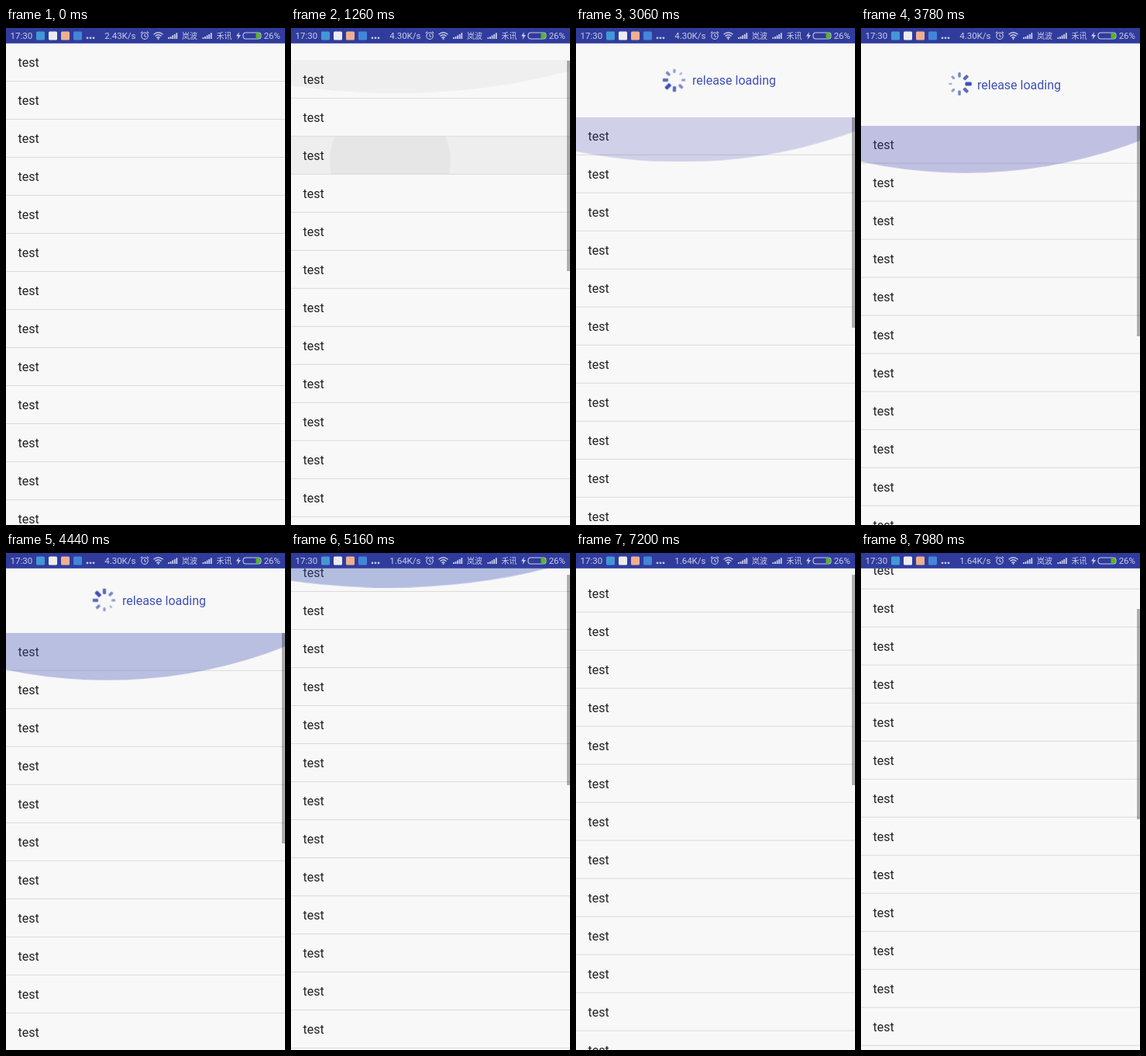
These frames come from a looping animation (360 by 640 pixels, 8000 ms). An HTML page:

```html
<!DOCTYPE html>
<html lang="en">
<head>
<meta charset="utf-8">
<title>Pull to refresh</title>
<style>
@property --pull { syntax: "<number>"; inherits: true; initial-value: 0; }

html, body { margin: 0; width: 100%; height: 100%; overflow: hidden; background: #f8f8f8; }
.stage {
  position: relative; width: 360px; height: 640px; overflow: hidden;
  background: #f8f8f8; font: 16px Roboto, sans-serif; color: #212121;
  animation: pull 8s linear infinite;
}
.stage * { box-sizing: border-box; }

/* Status bar */
.status {
  position: absolute; left: 0; top: 0; width: 360px; height: 20px;
  background: linear-gradient(#303c9c 19.2px, #303c9c80 20px);
}
.status svg { position: absolute; left: 0; top: 0; }
.status span {
  position: absolute; top: 0; line-height: 20px; font-size: 11.5px;
  color: #c9cce8; white-space: nowrap;
}
.status .carrier { font: 10px/20px "Noto Sans CJK SC", "Noto Sans CJK", sans-serif; }
.speed { right: 192.5px; opacity: 0; animation: 8s step-end infinite; }
.speed:nth-of-type(2) { animation-name: speed-a; }
.speed:nth-of-type(3) { animation-name: speed-b; }
.speed:nth-of-type(4) { animation-name: speed-c; }
@keyframes speed-a { 0% { opacity: 1 } 8.25%, 100% { opacity: 0 } }
@keyframes speed-b { 0% { opacity: 0 } 8.25% { opacity: 1 } 58.5%, 100% { opacity: 0 } }
@keyframes speed-c { 0% { opacity: 0 } 58.5%, 100% { opacity: 1 } }

/* Pulled header and list */
.view { position: absolute; left: 0; top: 20px; width: 360px; height: 620px; overflow: hidden; }
.header {
  position: absolute; left: 0; top: 0; width: 360px;
  height: max(0px, calc(var(--pull) * 1px)); overflow: hidden;
  color: #3f51b5;
}
.header > * { opacity: clamp(0, calc((var(--pull) - 32) / 22), 1); }
.header p { position: absolute; left: 150px; top: 50%; margin: -9px 0 0; line-height: 20px; white-space: nowrap; }
.spinner { position: absolute; left: 111px; top: calc(50% - 16.5px); width: 32px; height: 32px; }
.spinner g { animation: spin 8s infinite; }
.list { position: absolute; left: 0; top: 0; width: 360px; transform: translateY(calc(var(--pull) * 1px)); }
.row {
  position: relative; height: 49px; padding-left: 15.5px; line-height: 50px;
  border-bottom: 1px solid #dadada; overflow: hidden;
}
.row b { position: relative; font-weight: 400; }
.press { position: absolute; inset: 0; background: rgba(0, 0, 0, .038); animation: press 8s linear infinite; }
.press::after {
  content: ""; position: absolute; left: 50px; top: -47px; width: 156px; height: 156px;
  border-radius: 50%; background: rgba(0, 0, 0, .035); animation: ripple 8s linear infinite;
}
.glow {
  position: absolute; left: 0; top: 0; width: 360px; height: 72px; overflow: hidden;
  transform-origin: top; animation: glow 8s linear infinite;
}
.glow i {
  position: absolute; left: -405px; bottom: 0; width: 1080px; height: 1080px;
  border-radius: 50%; animation: tint 8s linear infinite, drift 8s linear infinite;
}
.thumb {
  position: absolute; right: 0; width: 4px; height: 271px; background: rgba(0, 0, 0, .3);
  top: calc(max(0, var(--pull)) * 1px + max(0, 0 - var(--pull)) * .436px);
  animation: thumb 8s linear infinite;
}

@keyframes pull {
  0%, 11.25% { --pull: 0 }
  15.75% { --pull: 21.7 }
  22% { --pull: 56 }
  30% { --pull: 84.8 }
  47.25% { --pull: 105.6 }
  54% { --pull: 100 }
  64.5% { --pull: -19 }
  67% { --pull: -16 }
  75% { --pull: 80 }
  79.5% { --pull: 93.7 }
  85% { --pull: 92 }
  97% { --pull: -110 }
  99.75%, 100% { --pull: -120.3 }
}
@keyframes spin {
  0% { transform: rotate(0deg); animation-timing-function: steps(35) }
  62.5% { transform: rotate(1575deg); animation-timing-function: step-end }
  62.51% { transform: rotate(45deg); animation-timing-function: steps(21) }
  100% { transform: rotate(990deg) }
}
@keyframes glow {
  0%, 11.25% { transform: scaleY(0) }
  15.75% { transform: scaleY(.59) }
  30% { transform: scaleY(.76) }
  47.25%, 56% { transform: scaleY(.847) }
  64.5% { transform: scaleY(.605) }
  79.5% { transform: scaleY(.11) }
  81%, 100% { transform: scaleY(0) }
}
@keyframes drift {
  0%, 47.25% { transform: none }
  64.5%, 100% { transform: translateX(-10px) }
}
@keyframes tint {
  0%, 11.25% { background: rgba(0, 0, 0, 0) }
  15.75% { background: rgba(0, 0, 0, .036) }
  30% { background: rgba(63, 55, 172, .13) }
  47.25% { background: rgba(63, 66, 175, .3) }
  64.5% { background: rgba(58, 85, 181, .355) }
  79.5% { background: rgba(63, 66, 175, .08) }
  81%, 100% { background: rgba(63, 66, 175, 0) }
}
@keyframes press {
  0%, 11.25% { opacity: 0 }
  12.5%, 16% { opacity: 1 }
  19.5%, 100% { opacity: 0 }
}
@keyframes ripple {
  0%, 11.25% { transform: scale(0) }
  15.75% { transform: scale(1) }
  19.5%, 100% { transform: scale(1.8) }
}
@keyframes thumb {
  0%, 11.25% { opacity: 0 }
  12%, 69% { opacity: 1 }
  73%, 86% { opacity: 0 }
  87%, 100% { opacity: 1 }
}
</style>
</head>
<body>
<div class="stage">
  <div class="view">
    <div class="header">
      <svg class="spinner" viewBox="-16 -16 32 32"><g id="spokes"></g></svg>
      <p>release loading</p>
    </div>
    <div class="list" id="list"><div class="glow"><i></i></div></div>
    <div class="thumb"></div>
  </div>
  <div class="status">
    <svg width="360" height="20" fill="#c9cce8">
      <rect x="39" y="4.5" width="11" height="11" rx="1.5" fill="#4198d5"/>
      <rect x="55" y="4.5" width="11" height="11" rx="1.5" fill="#ececf0"/>
      <rect x="71" y="4.5" width="11" height="11" rx="1.5" fill="#efb08f"/>
      <rect x="87" y="4.5" width="11" height="11" rx="1.5" fill="#4386d8"/>
      <circle cx="105" cy="12.8" r="1.4"/><circle cx="109" cy="12.8" r="1.4"/><circle cx="113" cy="12.8" r="1.4"/>
      <g fill="none" stroke="#c9cce8" stroke-width="1.1">
        <circle cx="179" cy="10.2" r="4.2"/>
        <path d="M179 7.8v2.6l1.8 1M173.8 6.6l2.4-2M184.2 6.6l-2.4-2"/>
        <path d="M190.5 8.2q6-5 12 0M192.5 10.5q4-3.4 8 0M194.5 12.6q2-1.6 4 0" stroke-width="1.4"/>
        <rect x="306" y="6" width="23" height="8" rx="3.5"/>
      </g>
      <circle cx="196.5" cy="14" r="1"/>
      <path id="bars" d="M209 12h1.8v2h-1.8zM211.6 11h1.8v3h-1.8zM214.2 9.5h1.8v4.5h-1.8zM216.8 8h1.8v6h-1.8zM219.4 6.2h1.8v7.8h-1.8z"/>
      <use href="#bars" x="44.5"/>
      <path d="M301 5l-4 5.6h2.6l-1 4.4 4.4-6h-2.8z"/>
      <path d="M322.5 6.5h3a3 3.5 0 0 1 0 7h-3z" fill="#55b81f"/>
    </svg>
    <span style="left:5.5px">17:30</span>
    <span class="speed">2.43K/s</span>
    <span class="speed">4.30K/s</span>
    <span class="speed">1.64K/s</span>
    <span class="carrier" style="left:227px">岚波</span>
    <span class="carrier" style="left:271.5px">禾讯</span>
    <span style="right:6px">26%</span>
  </div>
</div>
<script>
const ROWS = 29, PRESSED_ROW = 2, SPOKES = 8;

const rows = Array.from({ length: ROWS }, (_, i) =>
  `<div class="row">${i === PRESSED_ROW ? '<i class="press"></i>' : ''}<b>test</b></div>`);
document.getElementById('list').insertAdjacentHTML('afterbegin', rows.join(''));

// Spokes shrink and fade with their distance from the leading one.
const spokes = Array.from({ length: SPOKES }, (_, i) => {
  const far = Math.min(i, SPOKES - i) / (SPOKES / 2);
  const width = 4.8 - 2.2 * far, length = 8.2 - 4 * far;
  return `<rect x="${-width / 2}" y="${-11.6 - length / 2}" width="${width}" height="${length}" rx="1.2"
    fill="#3f51b5" opacity="${1 - .6 * far}" transform="rotate(${i * 360 / SPOKES})"/>`;
});
document.getElementById('spokes').innerHTML = spokes.join('');
</script>
</body>
</html>
```
